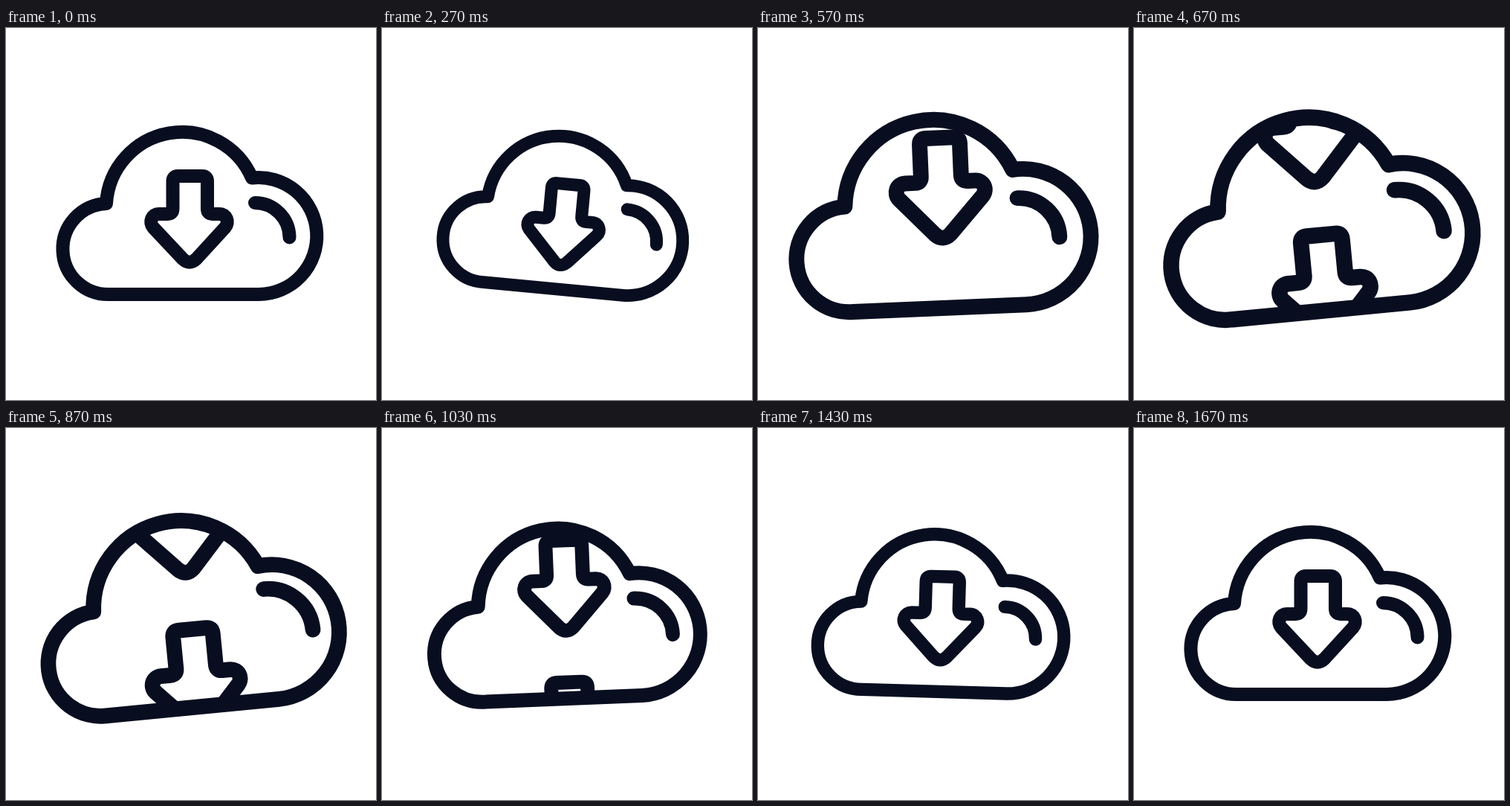
Animation, 498 px wide and 500 px high, one loop 2010 ms. Source, as an HTML page:

```html
<!DOCTYPE html>
<html lang="en">
<head>
<meta charset="utf-8">
<title>Cloud download</title>
<style>
  html, body { margin: 0; width: 100%; height: 100%; overflow: hidden; background: #fff; }
  svg { display: block; width: 100vw; height: 100vh; }
  .line { fill: none; stroke: #080e20; stroke-width: 18; stroke-linecap: round; stroke-linejoin: round; }
</style>
</head>
<body>
<svg viewBox="0 0 498 500">
  <defs>
    <path id="shape" d="M140 358A61 61 0 0 1 135 236A102.3 102.3 0 0 1 331 201.5A78.5 78.5 0 1 1 340.5 358Z"/>
    <path id="arrow" d="M231.5 199H264Q271 199 271 206V243Q271 250 278 250H287C297 250 301 261 295 268L256 310.500Q247 319 238 310.500L198 268C192 261 196 250 206 250H217.500Q224.500 250 224.500 243V206Q224.500 199 231.500 199Z"/>
    <clipPath id="inside"><use href="#shape"/></clipPath>
  </defs>
  <g id="cloud" class="line">
    <g id="arrows" clip-path="url(#inside)"></g>
    <use href="#shape"/>
    <path id="shine"/>
  </g>
</svg>
<script>
const LOOP = 2010, START = 170, END = 1670, STEP = 100 / 3;
const OFFSETS = [0, 202, 378, 560];
const $ = id => document.getElementById(id);

// Eases through turning points [time, value, bias]; a bias below 1 starts faster
const track = (...keys) => t => {
  const i = keys.findIndex(k => k[0] > t);
  if (i < 1) return keys[i ? keys.length - 1 : 0][1];
  const [t0, from] = keys[i - 1], [t1, to, bias = 1] = keys[i];
  const x = ((t - t0) / (t1 - t0)) ** bias;
  return from + (to - from) * x * x * (3 - 2 * x);
};

const scaleAt = track([137, 1], [270, .942], [715, 1.2, .7], [1280, .951], [END, 1]);
const angleAt = track([137, 0], [300, 5.9], [725, -6], [1260, 2.8, 1.5], [END, 0]);
const shineAt = track([230, 1], [420, .93], [790, 1.15], [1290, .915], [END, 1]);

// Speeds up until the middle, then coasts to rest
function scrollAt(t) {
  const mid = 670, way = 276, total = OFFSETS[3];
  if (t < mid) return way * (Math.max(0, t - 137) / (mid - 137)) ** 2.5;
  return total - (total - way) * (Math.max(0, END - t) / (END - mid)) ** 4.1;
}

const arrows = OFFSETS.map(() => {
  const use = document.createElementNS("http://www.w3.org/2000/svg", "use");
  use.setAttribute("href", "#arrow");
  return $("arrows").appendChild(use);
});

function draw(ms) {
  const n = Math.floor((ms - START + 6.7) / STEP);
  const t = n < 0 ? 0 : START + n * STEP;
  $("cloud").setAttribute("transform",
    `translate(245 244) rotate(${angleAt(t)}) scale(${scaleAt(t)}) translate(-245 -244)`);
  arrows.forEach((a, i) => a.setAttribute("transform", `translate(0 ${scrollAt(t) - OFFSETS[i]})`));
  const r = 46.5 * shineAt(t), x = 335, y = 281.5;
  $("shine").setAttribute("d", `M${x} ${y - r}A${r} ${r} 0 0 1 ${x + r} ${y}`);
}

const begin = performance.now();
function tick() {
  draw((performance.now() - begin) % LOOP);
  requestAnimationFrame(tick);
}
tick();
</script>
</body>
</html>
```
